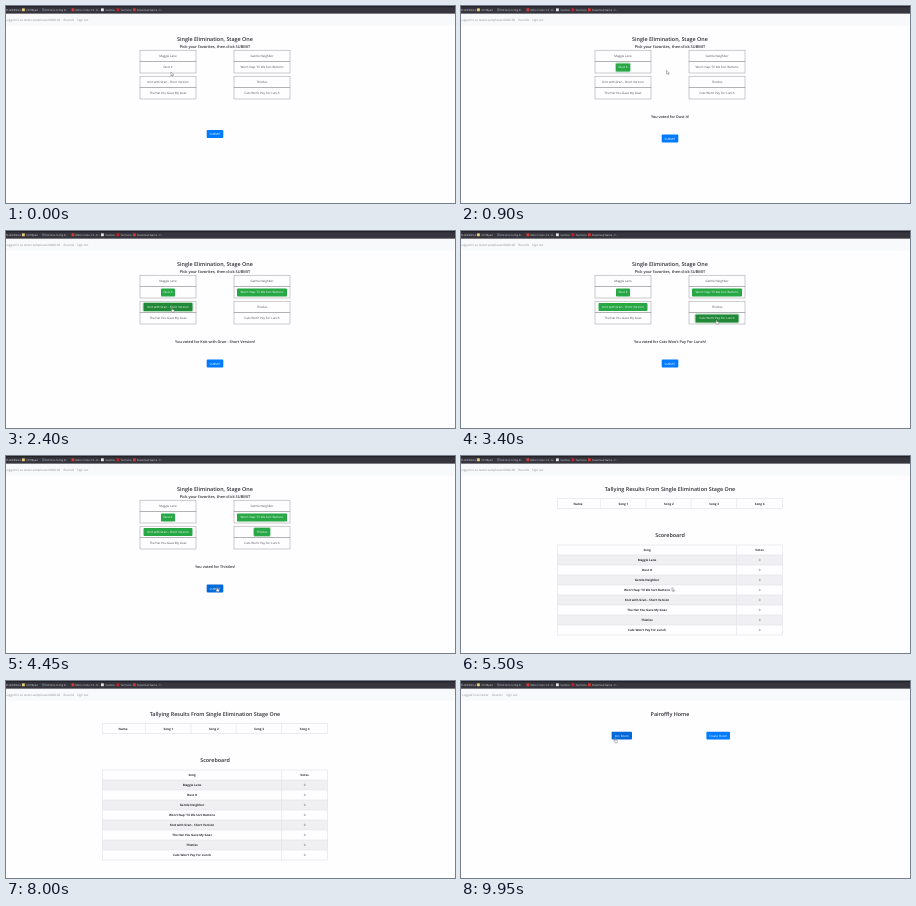
Recreate the animation shown at these times as an HTML page. Size 449 by 197 pixels, loop 10 s.

```html
<!DOCTYPE html>
<html lang="en">
<head>
<meta charset="utf-8">
<title>Song bracket</title>
<style>
  html, body { margin: 0; width: 100%; height: 100%; overflow: hidden; background: #fefdff; }
  svg { display: block; width: 449px; height: 197px; }
  text {
    font: 3px "Open Sans", "Noto Sans", sans-serif; fill: #4a4d51;
    text-anchor: middle; text-rendering: geometricPrecision;
  }
  .h { font-size: 5.4px; font-weight: 600; fill: #2b2e33; }
  .sub { font-size: 3.9px; font-weight: 600; fill: #2b2e33; }
  .msg { font-size: 3.75px; font-weight: 600; fill: #2b2e33; }
  .b { font-weight: 700; fill: #2b2e33; }
  .w { fill: #fff; }
  .nav { text-anchor: start; fill: #8e9093; }
  .mark { text-anchor: start; fill: #d8d8dc; font-size: 2.6px; }
  .cell { fill: none; stroke: #999; stroke-width: .5; }
  .line { fill: none; stroke: #dee2e6; stroke-width: .6; }
</style>
</head>
<body>
<svg id="stage" viewBox="0 0 449 197" xmlns="http://www.w3.org/2000/svg"></svg>
<script>
const NS = 'http://www.w3.org/2000/svg';
const LOOP = 10000, FADE = 150;
const BLUE = '#007bff', BLUE_HOVER = '#0069d9', GREEN = '#28a745', GREEN_HOVER = '#218838';
const stage = document.getElementById('stage');

function add(parent, tag, attrs) {
  const el = document.createElementNS(NS, tag);
  for (const k in attrs) el.setAttribute(k, attrs[k]);
  return parent.appendChild(el);
}
const group = () => add(stage, 'g', {});
const rect = (g, x, y, width, height, attrs) => add(g, 'rect', { x, y, width, height, ...attrs });
function text(g, x, y, str, cls = '') {
  const el = add(g, 'text', { x, y, class: cls });
  el.textContent = str;
  return el;
}
function button(g, x, y, w, h, label, fill) {
  const box = rect(g, x, y, w, h, { rx: .9, fill });
  const caption = text(g, x + w / 2, y + h / 2 + 1.05, label, 'w');
  return { box, caption };
}
const show = (el, on) => el.setAttribute('display', on ? 'inline' : 'none');
const clamp = v => Math.min(1, Math.max(0, v));

// Browser bar and site navigation
const chrome = group();
rect(chrome, 0, 0, 449, 7.8, { fill: '#36353d' });
rect(chrome, 0, 0, 449, 1.2, { fill: '#222126' });
rect(chrome, 0, 7.8, 449, 11.7, { fill: '#f8f9fa' });
[[0, 'PLANNING-S..'], [20.5, 'NOTEpad'], [39, 'Old time to Dig D..'], [69.5, 'Minor Code: CS - D..'],
 [99.5, 'Gulmox'], [114.5, 'Tunmora'], [131, 'Download Game - C..']]
  .forEach(([x, s]) => text(chrome, x, 4.8, s, 'mark'));
[[16, '#e8cf7a'], [36, '#55606e'], [65.5, '#d93a36'], [95, '#e6e6e6'], [110.5, '#c8202b'], [127, '#d8342f']]
  .forEach(([x, fill]) => rect(chrome, x, 2.4, 2.8, 2.8, { fill }));

function nav(g, user, linkX, outX) {
  text(g, linkX - 3.4, 15, user, 'nav').style.textAnchor = 'end';
  text(g, linkX, 15, 'Rounds', 'nav');
  text(g, outX, 15, 'Sign out', 'nav');
}

// Voting page
const vote = group();
nav(vote, 'Logged in as tester.sampleuser0000.00', 57.5, 71);
text(vote, 209, 35, 'Single Elimination, Stage One', 'h');
text(vote, 209, 42, 'Pick your favorites, then click SUBMIT', 'sub');

// Song title, button width, time voted, time withdrawn
const songs = [
  ['Maggie Lane'],
  ['Dust It', 14, 650],
  ['Gentle Neighbor'],
  ["Won't Nap 'Til We Sort Buttons", 50, 1400],
  ['Knit with Gran - Short Version', 49, 2250],
  ['The Hat You Gave My Goat'],
  ['Thistles', 16, 3850],
  ["Cats Won't Pay For Lunch", 43, 3150, 3850]
].map(([title, width, on = Infinity, off = Infinity], i) => {
  const cx = i & 2 ? 256 : 162;
  const y = (i < 4 ? 44.2 : 70.2) + (i % 2) * 11.4;
  rect(vote, cx - 28, y, 56, 11.4, { class: 'cell' });
  const song = { title, on, off };
  if (width) {
    song.ring = rect(vote, cx - width / 2 - .4, y + 1.4, width + .8, 8.8,
      { rx: 1.2, fill: 'none', stroke: GREEN, 'stroke-width': .8 });
    song.box = rect(vote, cx - width / 2, y + 1.8, width, 8, { rx: .9, fill: GREEN });
  }
  song.caption = text(vote, cx, y + 6.85, title);
  return song;
});
const votes = songs.filter(s => s.box).sort((a, b) => a.on - b.on);
const message = text(vote, 209, 111.8, '', 'msg');
const submitGroup = add(vote, 'g', {});
const submit = button(submitGroup, 200.7, 123.9, 16.6, 8, 'SUBMIT', BLUE);

// Results page
const tally = group();
nav(tally, 'Logged in as tester.sampleuser0000.00', 57.5, 71);
text(tally, 209, 35, 'Tallying Results From Single Elimination Stage One', 'h');
rect(tally, 96.5, 42.5, 225, 10, { class: 'line' });
['Name', 'Song 1', 'Song 2', 'Song 3', 'Song 4'].forEach((s, i) => {
  const x = 117 + i * 45.4;
  text(tally, x, 48.6, s, 'b');
  if (i) add(tally, 'path', { d: `M${x - 23} 42.5v10`, class: 'line' });
});
text(tally, 209, 81.3, 'Scoreboard', 'h');
text(tally, 186, 95.1, 'Song', 'b');
text(tally, 298.5, 95.1, 'Votes', 'b');
songs.forEach((s, i) => {
  const y = 99 + i * 10;
  rect(tally, 96.5, y, 225, 10, { fill: i % 2 ? 'none' : '#f0eff1' });
  add(tally, 'path', { d: `M96.5 ${y}h225`, class: 'line' });
  text(tally, 186, y + 6.1, s.title, 'b');
  text(tally, 298.5, y + 6.1, '0');
});
rect(tally, 96.5, 89, 225, 90, { class: 'line' });
add(tally, 'path', { d: 'M275.5 89v90', class: 'line' });

// Home page
const home = group();
nav(home, 'Logged in as tester', 31, 45);
text(home, 209, 35, 'Pairoffly Home', 'h');
const join = button(home, 150.6, 50.7, 20.4, 7.8, 'Join Room', BLUE);
button(home, 245.4, 50.7, 23.6, 7.8, 'Create Room', BLUE);

// Pointer
const pointer = group();
const ink = { fill: '#fff', stroke: '#555', 'stroke-width': .4, 'stroke-linejoin': 'round' };
const arrow = add(pointer, 'path', { d: 'M0 0V3.8L.9 3 1.5 4.3 2.1 4 1.6 2.8H2.7Z', ...ink });
const hand = add(pointer, 'path',
  { d: 'M-.4 .3Q0-.3 .4 .3V1.6L2 1.9Q2.5 2.1 2.3 3L1.9 4.2H0L-1.3 2.6Q-1.2 2-.4 2.5Z', ...ink });

// Time, x, y of the pointer tip
const path = [
  [0, 165, 66], [350, 163, 63.6], [450, 163, 63.6], [500, 162.5, 62.5], [700, 162.5, 62.5],
  [1100, 248, 66], [1300, 248, 66], [1500, 244.5, 65.2], [1650, 244.5, 65.2],
  [2150, 166, 77], [2400, 166, 77], [3050, 255.5, 89], [3430, 255.5, 89],
  [3750, 256, 77.5], [3950, 256, 77.5], [4430, 211, 131.5], [6130, 211, 131.5],
  [6400, 165.3, 125.2], [6550, 165.3, 125.2], [6700, 162.6, 125.2], [7080, 162.6, 125.2],
  [7250, 159.6, 125.2], [7430, 159.6, 125.2], [8000, 54, -6],
  [9180, 418, -6], [9800, 155, 57.6], [9900, 155, 57.6], [9950, 154, 57.5], [LOOP, 154, 57.5]
];
function tip(t) {
  const i = path.findIndex(p => p[0] > t);
  const [t0, x0, y0] = path[i - 1], [t1, x1, y1] = path[i];
  const p = (t - t0) / (t1 - t0), e = p * p * (3 - 2 * p);
  return [x0 + (x1 - x0) * e, y0 + (y1 - y0) * e];
}
function over(el, x, y) {
  const n = k => +el.getAttribute(k);
  return x >= n('x') && x <= n('x') + n('width') && y >= n('y') && y <= n('y') + n('height');
}

function draw(t) {
  const page = t < 5450 ? vote : t < 9200 ? tally : home;
  [vote, tally, home].forEach(g => show(g, g === page));

  const [x, y] = tip(t);
  const last = votes.filter(s => s.on <= t).pop();
  const drop = last ? 4.6 : 0;
  let link = false;

  if (page === vote) {
    votes.forEach(s => {
      const k = clamp((t - s.on) / FADE) - clamp((t - s.off) / FADE);
      const hover = over(s.box, x, y);
      link = link || hover;
      s.box.setAttribute('opacity', k);
      s.box.setAttribute('fill', hover ? GREEN_HOVER : GREEN);
      const focus = s === last ? 1 - clamp((t - 4950) / 200) : 0;
      s.ring.setAttribute('opacity', .5 * k * focus);
      const c = v => Math.round(v + (255 - v) * k);
      s.caption.style.fill = `rgb(${c(74)},${c(77)},${c(81)})`;
    });
    message.textContent = last ? `You voted for ${last.title}!` : '';
    submitGroup.setAttribute('transform', `translate(0 ${drop})`);
    const hover = over(submit.box, x, y - drop);
    link = link || hover;
    submit.box.setAttribute('fill', hover ? BLUE_HOVER : BLUE);
  } else if (page === home) {
    link = over(join.box, x, y);
    join.box.setAttribute('fill', link ? BLUE_HOVER : BLUE);
  }
  pointer.setAttribute('transform', `translate(${x} ${y})`);
  show(arrow, !link);
  show(hand, link);
}

const start = performance.now();
function tick() {
  draw((performance.now() - start) % LOOP);
  requestAnimationFrame(tick);
}
tick();
</script>
</body>
</html>
```
